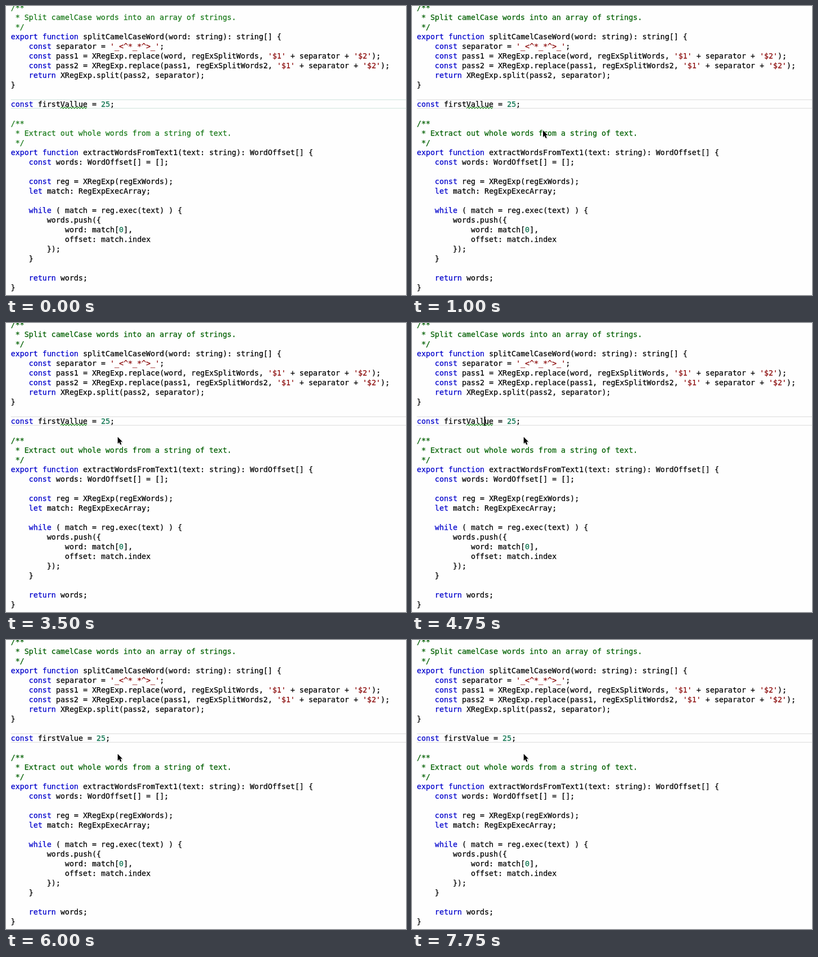
An HTML page for the animation above (8 s loop, 745x539 px).

```html
<!DOCTYPE html>
<html lang="en">
<head>
<meta charset="utf-8">
<title>Fixing a spelling mistake</title>
<style>
  html, body { margin: 0; width: 100%; height: 100%; overflow: hidden; background: #fefefe; }
  svg { display: block; width: 745px; height: 539px; }
  text {
    font: 13.95px "DejaVu Sans Mono", monospace; white-space: pre;
    fill: var(--ink); stroke: var(--ink); stroke-width: .25px;
  }
  .plain { --ink: #000; }
  .comment { --ink: var(--comment); }
  .keyword { --ink: #0000cc; }
  .string { --ink: #8c0c0c; }
  .number { --ink: #08724c; }
  .border { fill: var(--border); }
</style>
</head>
<body>
<svg id="stage" viewBox="0 0 745 539">
  <rect class="border" x="9" y="174" width="736" height="1.5"/>
  <rect class="border" x="9" y="190" width="736" height="1.5"/>
  <g id="code"></g>
  <path id="squiggle" fill="none" stroke="#1c8a1c" stroke-width="1.1"/>
  <rect id="caret" y="174.5" width="2" height="17.5"/>
  <g id="pointer">
    <path d="M1 2V14.5L4 11.8L6.2 16.4L8.4 15.4L6.4 11H10.5Z" fill="#000" opacity=".15"/>
    <path d="M0 0V12.4L2.9 9.8L4.8 14.4L7 13.5L5.1 9.1H8.9Z" fill="#000" stroke="#fff" stroke-width="1" paint-order="stroke"/>
  </g>
</svg>
<script>
const LOOP = 8000, LEFT = 9, CHAR = 8.4, LINE = 18, BASELINE = 8, EDIT_ROW = 10;
const SVG_NS = 'http://www.w3.org/2000/svg';
const $ = id => document.getElementById(id);
const columnX = col => LEFT + col * CHAR;

const source = `/**
 * Split camelCase words into an array of strings.
 */
export function splitCamelCaseWord(word: string): string[] {
    const separator = '_<^*_*^>_';
    const pass1 = XRegExp.replace(word, regExSplitWords, '$1' + separator + '$2');
    const pass2 = XRegExp.replace(pass1, regExSplitWords2, '$1' + separator + '$2');
    return XRegExp.split(pass2, separator);
}

const firstVallue = 25;

/**
 * Extract out whole words from a string of text.
 */
export function extractWordsFromText1(text: string): WordOffset[] {
    const words: WordOffset[] = [];

    const reg = XRegExp(regExWords);
    let match: RegExpExecArray;

    while ( match = reg.exec(text) ) {
        words.push({
            word: match[0],
            offset: match.index
        });
    }

    return words;
}`;

const syntax = [
  ['comment', /^(\/\*\*| \*).*/],
  ['string', /^'[^']*'/],
  ['keyword', /^(export|function|const|return|while|let)\b/],
  ['number', /^\d+\b/],
  ['plain', /^(\w+|[^\w\s'])/]
];

function drawLine(group, line, row) {
  group.replaceChildren();
  for (let col = 0; col < line.length;) {
    const rest = line.slice(col);
    const rule = syntax.find(([, pattern]) => pattern.test(rest));
    if (!rule) { col++; continue; }
    const [kind, pattern] = rule;
    const token = rest.match(pattern)[0];
    const text = document.createElementNS(SVG_NS, 'text');
    text.setAttribute('class', kind);
    text.setAttribute('x', columnX(col));
    text.setAttribute('y', BASELINE + row * LINE);
    text.textContent = token;
    group.append(text);
    col += token.length;
  }
}

const rows = source.split('\n').map((line, row) => {
  const group = document.createElementNS(SVG_NS, 'g');
  $('code').append(group);
  drawLine(group, line, row);
  return group;
});

// [time, tip x, tip y]
const pointerSteps = [
  [0], [750, 299, 269], [1000, 244, 232], [1250, 168, 196], [1500, 122, 182],
  [1750, 129.5, 180], [2250, 118, 180], [2500, 148, 187], [2750, 188, 203], [3000, 208, 212.5]
];

// [time, column]
const caretSteps = [
  [0], [3000, 23], [3500], [3750, 22], [4000, 20], [4250, 18], [4500, 17], [4750, 15],
  [5250, 14], [6000], [6500, 14], [6750, 16], [7000, 18], [7250, 20], [7500, 22], [7750]
];

// [time, line, underline end column]
const editSteps = [
  [0, 'const firstVallue = 25;', 17],
  [5250, 'const firstValue = 25;', 16],
  [5500, 'const firstValue = 25;', 0]
];

const stepAt = (steps, time) => steps.findLast(step => step[0] <= time);
const show = (element, visible) => element.setAttribute('visibility', visible ? 'visible' : 'hidden');

function squigglePath(endCol) {
  const end = columnX(endCol);
  let path = '', up = false;
  for (let x = columnX(11); x <= end; x += 2.6, up = !up)
    path += `${path ? 'L' : 'M'}${x} ${up ? 188.6 : 191.2}`;
  return path;
}

let shownEdit;
function render(time) {
  const early = time < 250;
  $('stage').style.setProperty('--comment', early ? '#1a7a1a' : '#006000');
  $('stage').style.setProperty('--border', early ? '#dcebe6' : '#e5e5e5');

  const [, x, y] = stepAt(pointerSteps, time);
  show($('pointer'), x !== undefined);
  if (x !== undefined) $('pointer').setAttribute('transform', `translate(${x} ${y})`);

  const [, col] = stepAt(caretSteps, time);
  show($('caret'), col !== undefined);
  if (col !== undefined) $('caret').setAttribute('x', columnX(col) - 0.5);

  const edit = stepAt(editSteps, time);
  if (edit !== shownEdit) {
    shownEdit = edit;
    drawLine(rows[EDIT_ROW], edit[1], EDIT_ROW);
    $('squiggle').setAttribute('d', squigglePath(edit[2]));
  }
}

const start = performance.now();
function tick() {
  render((performance.now() - start) % LOOP);
  requestAnimationFrame(tick);
}
tick();
</script>
</body>
</html>
```
